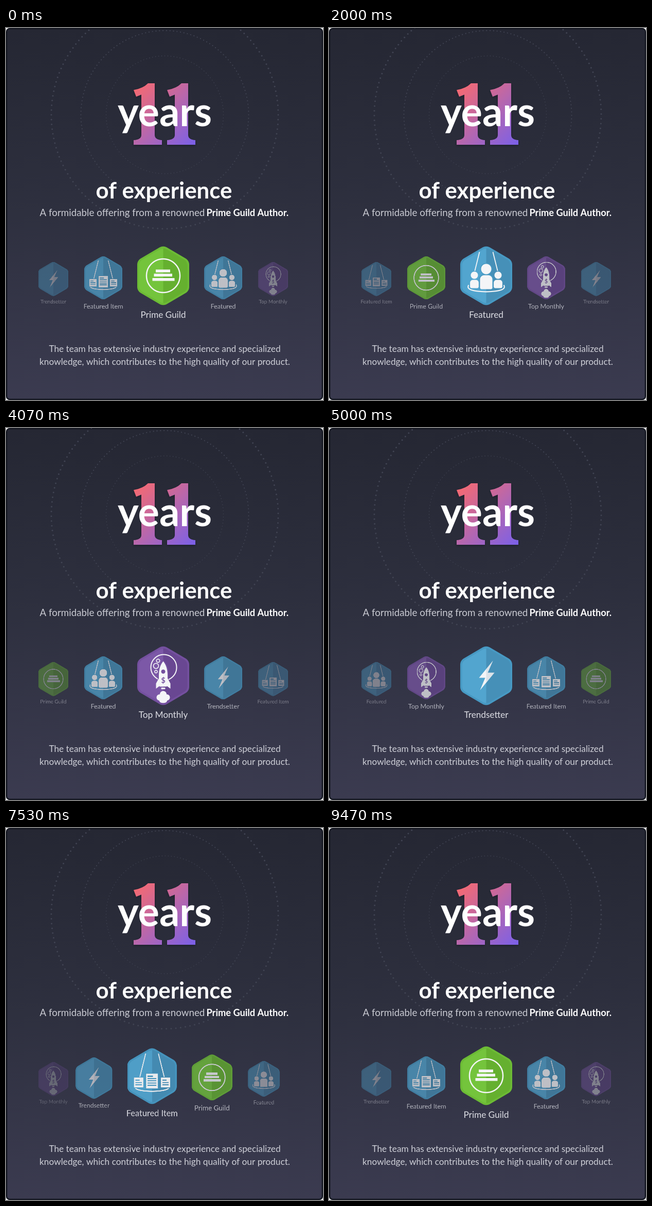
These frames come from a looping animation (616x720 px, 9540 ms). An HTML page with a canvas:

```html
<!DOCTYPE html>
<html lang="en">
<head>
<meta charset="utf-8">
<title>11 years of experience</title>
<style>
html, body { margin: 0; width: 100%; height: 100%; overflow: hidden; background: #fff; }
canvas { display: block; width: 616px; height: 720px; }
</style>
</head>
<body>
<canvas id="stage" width="616" height="720"></canvas>
<script>
const LOOP = 9540, FPS = 15;
const FIRST_STEP = 1123, STEP_EVERY = 1580, STEP_TIME = 600, STEPS = 5;
const W = 616, H = 720, TAU = Math.PI * 2;
const WHITE = '#f4f5f7', FONT = 'Lato, sans-serif';
const BLUE = { rim: '#4799c3', left: '#52a5cf', right: '#4690b8' };
const GREEN = { rim: '#6cbb35', left: '#74c43c', right: '#65b02f' };
const PURPLE = { rim: '#74509f', left: '#7c58a7', right: '#694792' };

const stage = document.getElementById('stage').getContext('2d');

function dot(c, x, y, r, color) {
  c.fillStyle = color;
  c.beginPath();
  c.arc(x, y, r, 0, TAU);
  c.fill();
}

function ring(c, x, y, r, width) {
  c.lineWidth = width;
  c.strokeStyle = WHITE;
  c.beginPath();
  c.arc(x, y, r, 0, TAU);
  c.stroke();
}

function shape(c, path, color) {
  c.fillStyle = color;
  c.fill(new Path2D(path));
}

function box(c, x, y, w, h, r, color) {
  c.fillStyle = color;
  c.beginPath();
  c.roundRect(x, y, w, h, r);
  c.fill();
}

function text(c, str, x, y, size, weight, color, align = 'center') {
  c.font = `${weight} ${size}px ${FONT}`;
  c.textAlign = align;
  c.fillStyle = color;
  c.fillText(str, x, y);
}

function hexagon(c, scale) {
  const p = [[0, -59], [50.5, -29.5], [50.5, 29.5], [0, 59], [-50.5, 29.5], [-50.5, -29.5]];
  c.beginPath();
  c.moveTo(25 * scale, -44.4 * scale);
  for (let i = 1; i <= 6; i++) {
    const [ax, ay] = p[i % 6], [bx, by] = p[(i + 1) % 6];
    c.arcTo(ax * scale, ay * scale, bx * scale, by * scale, 14 * scale);
  }
  c.closePath();
}

function spotlight(c) {
  c.strokeStyle = WHITE;
  c.lineWidth = 1.8;
  c.stroke(new Path2D('M-13 -46L-27 10M13 -46L27 10'));
  c.lineWidth = 2.2;
  c.stroke(new Path2D('M-34 18Q-42 30 0 31Q42 30 34 18'));
}

function page(c, x, y, w, h, ink) {
  box(c, x - 1.5, y - 1.5, w + 3, h + 3, 0, ink);
  box(c, x, y, w, h, 0, WHITE);
  box(c, x + 3, y + 4, w * .45, 2.5, 0, ink);
  for (let ly = y + 9; ly < y + h - 3; ly += 4.5) box(c, x + 3, ly, w - 6, 2, 0, ink);
}

function person(c, x, y, r, height, ink) {
  box(c, x - r * 1.2 - 2, y + r, r * 2.4 + 4, height + 2, [r, r, 0, 0], ink);
  dot(c, x, y, r + 1.5, ink);
  dot(c, x, y, r, WHITE);
  box(c, x - r * 1.2, y + r + 2, r * 2.4, height, [r * .8, r * .8, 3, 3], WHITE);
}

const icons = {
  bars(c) {
    ring(c, 0, 0, 32.5, 2.5);
    box(c, -14.5, -12, 28, 5.5, 0, WHITE);
    box(c, -18, -4, 35.5, 5.5, 0, WHITE);
    box(c, -21, 4.5, 43, 5.5, 0, WHITE);
  },
  people(c) {
    spotlight(c);
    person(c, -23, -1, 7, 16, BLUE.left);
    person(c, 23, -1, 7, 16, BLUE.right);
    person(c, 0, -13, 10, 27, BLUE.rim);
  },
  rocket(c) {
    ring(c, 1, -16, 25, 2);
    ring(c, -14, -19, 5, 1.6);
    ring(c, -10, -29, 3.2, 1.6);
    ring(c, -14, -8, 2.6, 1.6);
    shape(c, 'M0 -31C14 -17 11 4 9 20H-9C-11 4 -14 -17 0 -31Z', PURPLE.rim);
    shape(c, 'M-8 4L-14 15V25L-6 19ZM8 4L14 15V25L6 19Z', WHITE);
    shape(c, 'M0 -28C11 -15 9 4 7 21H-7C-9 4 -11 -15 0 -28Z', WHITE);
    dot(c, 0, -8, 4, PURPLE.rim);
    text(c, '$', 0, 14, 14, 700, PURPLE.rim);
    box(c, -4, 23, 8, 3, 1, WHITE);
    for (const [x, y, r] of [[-7, 42, 6], [7, 42, 6], [0, 36, 6.5], [0, 46, 8]]) dot(c, x, y, r, WHITE);
  },
  bolt(c) {
    shape(c, 'M13 -29L-14 4L-2 4L-12 28L16 -6L3 -6Z', WHITE);
    shape(c, 'M0 -13L13 -29L3 -6H16L0 13.5Z', '#dde3e9');
  },
  pages(c) {
    spotlight(c);
    page(c, -37, 3, 19, 20, BLUE.left);
    page(c, 18, 3, 19, 20, BLUE.right);
    page(c, -12, -5, 24, 30, BLUE.rim);
  }
};

// Badges are prepared once so that fading applies to each as a whole.
const SPRITE = 2, SPRITE_W = 160, SPRITE_H = 180, ORIGIN_Y = 70;
function makeBadge([label, icon, tone]) {
  const sprite = document.createElement('canvas');
  sprite.width = SPRITE_W * SPRITE;
  sprite.height = SPRITE_H * SPRITE;
  const c = sprite.getContext('2d');
  c.scale(SPRITE, SPRITE);
  c.translate(SPRITE_W / 2, ORIGIN_Y);
  hexagon(c, 1);
  c.fillStyle = tone.rim;
  c.fill();
  c.save();
  hexagon(c, .93);
  c.clip();
  box(c, -60, -60, 60, 120, 0, tone.left);
  box(c, 0, -60, 60, 120, 0, tone.right);
  icons[icon](c);
  c.restore();
  text(c, label, 0, 81.5, 17.2, 400, '#dedfe5');
  return sprite;
}

const badges = [
  ['Prime Guild', 'bars', GREEN],
  ['Featured', 'people', BLUE],
  ['Top Monthly', 'rocket', PURPLE],
  ['Trendsetter', 'bolt', BLUE],
  ['Featured Item', 'pages', BLUE]
].map(makeBadge);

// cubic-bezier(.25, .1, .25, 1)
function ease(x) {
  if (x <= 0) return 0;
  if (x >= 1) return 1;
  const curve = (u, a, b) => 3 * u * (1 - u) ** 2 * a + 3 * u * u * (1 - u) * b + u ** 3;
  let lo = 0, hi = 1;
  for (let i = 0; i < 20; i++) {
    const mid = (lo + hi) / 2;
    if (curve(mid, .25, .25) < x) lo = mid; else hi = mid;
  }
  return curve(lo, .1, 1);
}

const mix = (a, b, u) => a + (b - a) * u;
const along = (stops, d) => {
  const i = Math.min(Math.floor(d), stops.length - 2);
  return mix(stops[i], stops[i + 1], d - i);
};

function drawBadge(sprite, offset) {
  const d = Math.abs(offset), near = Math.min(d, 2);
  const alpha = d <= 2 ? along([1, .72, .4], d) : .4 * (1 - 1.8 * (d - 2));
  if (alpha <= 0) return;
  const scale = along([1, .733, .58], near);
  const x = 305.5 + Math.sign(offset) * along([0, 116.5, 213.5], near);
  const y = 479.5 + 15 * (1 - scale);
  stage.globalAlpha = alpha;
  stage.drawImage(sprite, x - SPRITE_W / 2 * scale, y - ORIGIN_Y * scale, SPRITE_W * scale, SPRITE_H * scale);
  stage.globalAlpha = 1;
}

function drawCarousel(t) {
  let pos = 0;
  for (let k = 0; k < STEPS; k++) pos += ease((t - FIRST_STEP - k * STEP_EVERY) / STEP_TIME);
  badges.forEach((sprite, i) => {
    for (const turn of [-5, 0, 5, 10]) {
      const offset = i - pos + turn;
      if (Math.abs(offset) < 3) drawBadge(sprite, offset);
    }
  });
}

function linear(x0, y0, x1, y1, ...colors) {
  const g = stage.createLinearGradient(x0, y0, x1, y1);
  colors.forEach((color, i) => g.addColorStop(i / (colors.length - 1), color));
  return g;
}

const backdrop = linear(0, 0, 0, H, '#252733', '#2e303f', '#3b3b50');
const numberFill = linear(250, 107, 368, 227, '#fb6a6c', '#b867ac', '#7960ea');
const one = new Path2D('M276 107H289V207Q289 216 303 217V226H248V217Q263 216 263 207V129L253 133L248 120Q266 117 276 107Z');

function drawOrbit(radius, count, size, shift) {
  for (let i = 0; i < count; i++) {
    const a = (i + shift) / count * TAU;
    dot(stage, 308.5 + radius * Math.cos(a), 168 + radius * Math.sin(a), size, '#414453');
  }
}

function drawNumber() {
  stage.save();
  stage.shadowColor = 'rgba(15,16,28,.5)';
  stage.shadowBlur = 5;
  stage.shadowOffsetY = 2;
  stage.fillStyle = numberFill;
  const pair = new Path2D(one);
  pair.addPath(one, new DOMMatrix([1, 0, 0, 1, 65, 0]));
  stage.fill(pair);
  stage.restore();
}

function draw(t) {
  stage.clearRect(0, 0, W, H);
  box(stage, 0, 0, W, H, 7, '#151822');
  box(stage, 2.5, 2.5, W - 5, H - 5, 5, backdrop);

  const p = t / LOOP;
  drawOrbit(114, 120, .8, p * 4);
  drawOrbit(163, 150, 1.1, -p * 4);
  drawOrbit(220.5, 150, 1.5, p * 4);

  drawNumber();
  text(stage, 'years', 308.5, 190, 77.5, 700, '#fff');
  text(stage, 'of experience', 307, 330, 43.8, 700, '#fff');
  text(stage, 'A formidable offering from a renowned', 65.5, 364, 18.8, 400, '#c9cad2', 'left');
  text(stage, 'Prime Guild Author.', 389.5, 364, 18.2, 700, '#fff', 'left');

  drawCarousel(t);

  text(stage, 'The team has extensive industry experience and specialized', 308.5, 626.5, 17.3, 400, '#cfd0d8');
  text(stage, 'knowledge, which contributes to the high quality of our product.', 308.5, 651.5, 17.3, 400, '#cfd0d8');
}

// Frames begin on rounded times, so a frame may start slightly early.
const frameTime = t => Math.floor(t * FPS / 1000 + .1) * 1000 / FPS;

const start = performance.now();
function tick() {
  draw(frameTime((performance.now() - start) % LOOP));
  requestAnimationFrame(tick);
}
tick();
</script>
</body>
</html>
```
